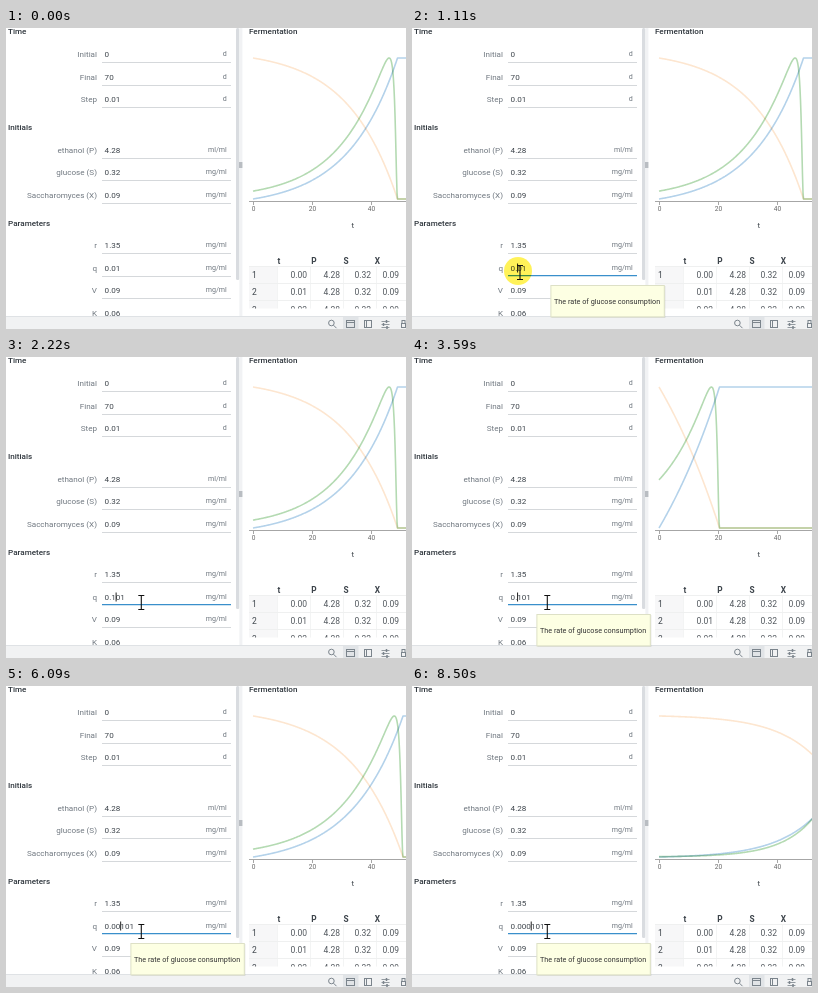
Animation, 400 px wide and 301 px high, one loop 8970 ms. Source, as an HTML page:

```html
<!DOCTYPE html>
<html lang="en">
<head>
<meta charset="utf-8">
<title>Fermentation model</title>
<style>
  html, body { margin: 0; width: 100%; height: 100%; overflow: hidden; background: #fff; }
  svg { display: block; width: 400px; height: 301px; font: 8.1px Roboto, Arial, sans-serif; fill: #3d444b; }
  .head { font-weight: 500; fill: #2f363d; }
  .label { fill: #707880; text-anchor: end; }
  .unit { font-size: 7.1px; fill: #707880; text-anchor: end; }
  .tick { font-size: 6.6px; fill: #666; text-anchor: middle; }
  .cell { font-size: 8.5px; fill: #50565c; text-anchor: end; }
  .col { font-size: 8.3px; font-weight: 700; text-anchor: middle; }
  .tip { font-size: 7.25px; fill: #333; }
  .curve { fill: none; stroke-width: 1.6; stroke-linejoin: round; mix-blend-mode: multiply; }
  .icon { fill: none; stroke: #7b848c; stroke-width: 1; }
</style>
</head>
<body>
<svg viewBox="0 0 400 301">
  <defs>
    <clipPath id="formClip"><rect width="230" height="288"/></clipPath>
    <clipPath id="gridClip"><rect x="243" y="225" width="157" height="55.5"/></clipPath>
  </defs>
  <rect width="400" height="301" fill="#fff"/>
  <g id="form" clip-path="url(#formClip)"></g>
  <rect x="230" width="3.4" height="252" rx="1.5" fill="#d9dce0"/>
  <rect x="233.4" width="3" height="288" fill="#f1f2f4"/>
  <rect x="233" y="134" width="3.4" height="6" fill="#b9bdc2"/>
  <text class="head" x="243" y="6.4">Fermentation</text>
  <g id="chart"></g>
  <g id="axis"></g>
  <g id="grid" clip-path="url(#gridClip)"></g>

  <rect y="288" width="400" height="13" fill="#f1f2f3"/>
  <path d="M0 288.5H400" stroke="#dfe2e5"/>
  <text id="status" x="-.5" y="299" fill="#6d747b" font-size="8">Calculating...</text>
  <rect x="337" y="289" width="15.5" height="12" fill="#e1e4e7"/>
  <g class="icon">
    <circle cx="325.4" cy="295" r="2.8"/><path d="M327.5 297.2L330.5 300.2"/>
    <rect x="340.5" y="292.5" width="8" height="7"/><path d="M340.5 294.5H348.5"/>
    <rect x="358.5" y="292.5" width="7" height="7"/><path d="M360.5 292.5V299.5"/>
    <path d="M375.5 293.5H383.5M375.5 296.5H383.5M375.5 299.5H383.5" stroke-width=".8"/>
    <path d="M380.5 292V295M377.5 295V298M381 298V301" stroke-width="1.5"/>
    <rect x="396" y="292.5" width="3" height="3"/><rect x="395.5" y="295.5" width="4" height="4"/>
  </g>

  <path id="focus" d="M96 247.6H225" stroke="#3a8fcb" stroke-width="1.2"/>
  <path id="caret" d="M0 235.5V244.5" stroke="#222"/>
  <g id="tip">
    <rect x="1" y="258" width="114" height="32" fill="#000" opacity=".1"/>
    <rect x=".5" y="257.5" width="113.4" height="31.4" fill="#fdffe3" stroke="#dde0c6"/>
    <text class="tip" x="3.6" y="276">The rate of glucose consumption</text>
  </g>
  <circle id="halo" cx="106" cy="243" r="14" fill="#fff03c" style="mix-blend-mode:multiply"/>
  <path id="arrow" d="M0 0V11.5L2.7 9L4.6 13L6.3 12.2L4.5 8.3H8Z" fill="#fff" stroke="#111" stroke-width=".8"/>
  <path id="beam" d="M-3 -7H3M0 -7V7M-3 7H3" fill="none" stroke="#111" stroke-width="1.1"/>
</svg>
<script>
const LOOP = 8970;
const $ = id => document.getElementById(id);

function add(parent, tag, attrs, text) {
  const el = document.createElementNS('http://www.w3.org/2000/svg', tag);
  for (const key in attrs) el.setAttribute(key, attrs[key]);
  if (text !== undefined) el.textContent = text;
  parent.append(el);
  return el;
}

// Form: sections of evenly spaced rows
const fields = {};
function section(title, titleY, firstY, rows) {
  const form = $('form');
  add(form, 'text', { class: 'head', x: 2, y: titleY + 2.9 }, title);
  rows.forEach(([name, value, unit], i) => {
    const y = firstY + 22.4 * i;
    add(form, 'text', { class: 'label', x: 91, y: y + 2.9 }, name);
    const text = add(form, 'text', { x: 98.6, y: y + 2.9 }, value);
    add(form, 'text', { class: 'unit', x: 220.8, y: y + 1.8 }, unit);
    const line = add(form, 'path', { d: `M96 ${Math.round(y + 8) + .5}H225`, stroke: '#d5d8db' });
    fields[name] = { text, line };
  });
}
section('Time', 3.5, 26.3, [['Initial', '0', 'd'], ['Final', '70', 'd'], ['Step', '0.01', 'd']]);
section('Initials', 99, 122, [
  ['ethanol (P)', '4.28', 'ml/ml'], ['glucose (S)', '0.32', 'mg/ml'], ['Saccharomyces (X)', '0.09', 'mg/ml']
]);
section('Parameters', 195, 217.4, [
  ['r', '1.35', 'mg/ml'], ['q', '0.01', 'mg/ml'], ['V', '0.09', 'mg/ml'], ['K', '0.06', '']
]);

// Axis
add($('axis'), 'path', { d: 'M243 173.5H400', stroke: '#a6a6a6' });
for (let i = 0; i < 3; i++) {
  const x = 247.5 + 59 * i;
  add($('axis'), 'path', { d: `M${x} 173.5V177`, stroke: '#a6a6a6' });
  add($('axis'), 'text', { class: 'tick', x, y: 183.4 }, 20 * i);
}
add($('axis'), 'text', { x: 345.6, y: 200, 'font-size': 8 }, 't');

// Table
const columns = [['t', 273, 301], ['P', 308, 334], ['S', 340, 365], ['X', 371.4, 393]];
add($('grid'), 'rect', { x: 243, y: 239, width: 28, height: 50, fill: '#f7f7f8' });
columns.forEach(([name, x], i) => {
  add($('grid'), 'text', { class: 'col', x, y: 236.3 }, name);
  add($('grid'), 'path', { d: `M${271.5 + 33 * i} 238V290`, stroke: '#f3f4f4' });
});
for (let row = 0; row < 3; row++) {
  const y = 250.2 + 17.2 * row;
  add($('grid'), 'path', { d: `M243 ${238.5 + 17 * row}H400`, stroke: '#eff0f0' });
  add($('grid'), 'text', { x: 246, y, 'font-size': 8.5 }, row + 1);
  [`0.0${row}`, '4.28', '0.32', '0.09'].forEach((s, i) =>
    add($('grid'), 'text', { class: 'cell', x: columns[i][2], y }, s));
}

// Chart: substrate turns into product until it runs out at `end`;
// biomass grows exponentially and collapses with the substrate.
function drawPlot({ end, growth, gain }) {
  const g = add($('chart'), 'g', {});
  const product = u => u < 1 ? Math.expm1(growth * u) / Math.expm1(growth) : 1;
  const substrate = u => 1 - product(u);
  const raw = u => {
    const s2 = substrate(u) ** 2;
    return Math.exp(gain * (u - 1)) * s2 / (s2 + .003);
  };
  let peak = 0;
  for (let u = 0; u < 1; u += .005) peak = Math.max(peak, raw(u));
  const biomass = u => raw(u) / peak;

  [['#fde6d0', substrate], ['#b4d2ea', product], ['#b4dab2', biomass]].forEach(([stroke, f]) => {
    const points = [];
    for (let s = 0; s <= 155; s += .5) points.push(`${247 + s} ${(171 - 141 * f(s / end)).toFixed(2)}`);
    add(g, 'path', { class: 'curve', stroke, d: 'M' + points.join('L') });
  });
  return g;
}
const plots = [
  { end: 144.5, growth: 2.9, gain: 3.17 },
  { end: 60.5, growth: .6, gain: 1.35 },
  { end: 150, growth: 2.9, gain: 3.17 },
  { end: 206, growth: 5, gain: 6 },
  { end: 206, growth: 5, gain: 6.4 }
].map(drawPlot);

// Key presses in the q field: time, text, caret index
const keys = [
  [1110, '0.01', 2], [1950, '0.101', 3], [3590, '0.101', 2],
  [4780, '0.0101', 3], [6090, '0.00101', 4], [7330, '0.000101', 5]
];
const runs = [2350, 5180, 6420, 7730];
const BUSY = 560, BLINK = 530;

const show = (el, on) => el.setAttribute('visibility', on ? 'visible' : 'hidden');
const place = (el, x, y) => el.setAttribute('transform', `translate(${x} ${y})`);
const span = (t, a, b) => Math.min(1, Math.max(0, (t - a) / (b - a)));
const ease = u => u * u * (3 - 2 * u);

function drawField(t) {
  const key = keys.findLast(k => k[0] <= t);
  const { text, line } = fields.q;
  text.textContent = key ? key[1] : '0.01';
  show(line, !key);
  show($('focus'), key);
  show($('caret'), key && Math.floor((t - key[0]) / BLINK) % 2 === 0);
  if (key) place($('caret'), text.getStartPositionOfChar(key[2]).x + .3, 0);
}

function drawPointer(t) {
  const enter = ease(span(t, 150, 840)), shift = ease(span(t, 1660, 2080));
  const x = 385 - 277 * enter + 27.3 * shift;
  const y = -16 + 260.5 * Math.sin(enter * Math.PI / 2) + shift;
  const overField = x < 225 && y > 232;
  show($('arrow'), t >= 150 && !overField);
  show($('beam'), overField);
  place($('arrow'), x, y);
  place($('beam'), x, y);
  show($('halo'), t >= 1110 && t < 1460);
  $('halo').setAttribute('opacity', .85 * (1 - span(t, 1180, 1460)));
}

function render(t) {
  const done = runs.filter(r => r <= t).length;
  plots.forEach((g, i) => show(g, i === done));
  show($('status'), runs.some(r => t >= r && t < r + BUSY));
  show($('tip'), (t >= 700 && t < 1660) || t >= 2420);
  place($('tip'), t < 1660 ? 138.4 : 124.4, 0);
  drawField(t);
  drawPointer(t);
}

const start = performance.now();
function loop() {
  render((performance.now() - start) % LOOP);
  requestAnimationFrame(loop);
}
loop();
</script>
</body>
</html>
```
